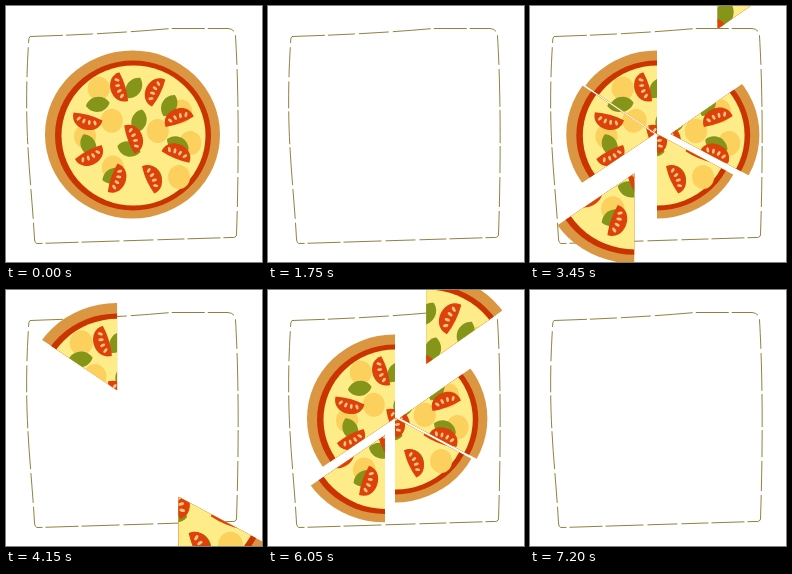
An HTML page with a canvas that plays this animation: 256 by 256 pixels, repeating every 8 s.

```html
<!DOCTYPE html>
<html lang="en">
<head>
<meta charset="utf-8">
<title>Pizza slices</title>
<style>
html, body { margin: 0; width: 100%; height: 100%; overflow: hidden; background: #fff; }
canvas { display: block; width: 100vw; height: 100vh; }
</style>
</head>
<body>
<canvas id="stage"></canvas>
<script>
const LOOP = 8000, STEP = 50, CYCLE = 8200 / 3, STAGGER = 190, DELAY = 80;
const CX = 127, CY = 128, RAD = Math.PI / 180;
const CUTS = [-90, -35, 28, 90, 146, 214, 270];
const LEAF_TILTS = [-8, 122, 118, 25, 52, -22, 66];
const FRAME = new Path2D(`M24 30.5C70 29 115 27 165 22.5H222Q229 23 229.5 30
  C232 70 233.5 140 230.5 229Q230 232 225 231.5L32 237.5Q29 238 28.5 233
  C25 170 17 125 22.5 38Q22.5 31 24 30.5`);
const canvas = document.getElementById('stage');
const ctx = canvas.getContext('2d');

function ellipse(x, y, rx, ry, color, tilt = 0) {
  ctx.fillStyle = color;
  ctx.beginPath();
  ctx.ellipse(x, y, rx, ry, tilt * RAD, 0, 7);
  ctx.fill();
}

// Calls put(x, y, angle, index) for count places around the centre
function ring(count, start, step, radius, grow, put) {
  for (let i = 0; i < count; i++) {
    const angle = start + i * step, r = radius + i * grow;
    put(CX + r * Math.cos(angle * RAD), CY + r * Math.sin(angle * RAD), angle, i);
  }
}

function blob(x, y) {
  ellipse(x, y, 11, 12, '#fbd05c');
}

function leaf(x, y, tilt) {
  ctx.save();
  ctx.translate(x, y);
  ctx.rotate(tilt * RAD);
  ctx.fillStyle = '#84951a';
  ctx.beginPath();
  ctx.moveTo(-12, 0);
  ctx.bezierCurveTo(-7, -10, 7, -10, 12, 0);
  ctx.bezierCurveTo(7, 10, -7, 10, -12, 0);
  ctx.fill();
  ctx.restore();
}

// Half moon lying along the given angle
function tomato(x, y, angle) {
  ctx.save();
  ctx.translate(x, y);
  ctx.rotate(angle * RAD);
  ctx.fillStyle = '#dc420a';
  ctx.beginPath();
  ctx.moveTo(-15, 5);
  ctx.bezierCurveTo(-15, -13, 15, -13, 15, 5);
  ctx.quadraticCurveTo(0, 8, -15, 5);
  ctx.fill();
  for (let i = -1.5; i < 2; i++)
    ellipse(i * 5.6, Math.abs(i) - 1, 1.4, 2.6, '#f9c583', i * 22);
  ctx.restore();
}

function pizza() {
  ellipse(126.5, 128.5, 87.5, 84, '#db9642');
  ellipse(127, 129.5, 78, 75, '#c93400');
  ellipse(127.5, 129.5, 72, 70, '#fdec88');
  ring(3, -25, 34, 53, 5, blob);
  ring(3, 121, 56, 39, 9, blob);
  ring(2, 212, 141, 25, 0, blob);
  ring(7, -140, 51, 46, 0, (x, y, angle, i) => leaf(x, y, LEAF_TILTS[i]));
  leaf(133, 115, 105);
  leaf(123, 143, 15);
  ring(8, -107, 43.2, 48, 0, tomato);
  tomato(128, 132, 70);
}

function travel(ms) {
  const x = Math.max(0, ms - DELAY) / 670;
  return 24 * x + 117 * x ** 3.4;
}

// Opposite slices leave in turn: 0, 3, 1, 4, 2, 5
function distance(slice, phase) {
  const turn = slice % 3 * 2 + (slice > 2);
  return travel(phase - turn * STAGGER);
}

function addWedge(path, slice) {
  path.moveTo(CX, CY);
  path.arc(CX, CY, 100, CUTS[slice] * RAD, CUTS[slice + 1] * RAD);
  path.closePath();
}

// A slice slides outwards and grows a little from its tip
function drawSlice(slice, d) {
  const dir = (slice - 1) * 60 * RAD, zoom = 1 + d / 700;
  const wedge = new Path2D();
  addWedge(wedge, slice);
  ctx.save();
  ctx.translate(CX + d * Math.cos(dir), CY + d * Math.sin(dir));
  ctx.scale(zoom, zoom);
  ctx.translate(-CX, -CY);
  ctx.clip(wedge);
  pizza();
  ctx.restore();
}

function draw(t) {
  const phase = t % CYCLE, { width, height } = canvas;
  ctx.setTransform(width / 256, 0, 0, height / 256, 0, 0);
  ctx.fillStyle = '#fff';
  ctx.fillRect(0, 0, 256, 256);
  ctx.strokeStyle = '#83742c';
  ctx.lineWidth = 0.9;
  ctx.setLineDash([33, 3, 27, 4, 30, 4, 38, 3]);
  ctx.stroke(FRAME);

  // Slices at rest share one clip, so no seams show
  const rest = new Path2D();
  for (let i = 0; i < 6; i++) if (!distance(i, phase)) addWedge(rest, i);
  ctx.save();
  ctx.clip(rest);
  pizza();
  ctx.restore();
  for (let i = 0; i < 6; i++) {
    const d = distance(i, phase);
    if (d) drawSlice(i, d);
  }
}

function resize() {
  const ratio = window.devicePixelRatio || 1;
  canvas.width = Math.round(innerWidth * ratio);
  canvas.height = Math.round(innerHeight * ratio);
}

let start;
function tick(now) {
  start ??= now;
  const t = (now - start) % LOOP;
  draw(Math.floor(t / STEP) * STEP);
  requestAnimationFrame(tick);
}

addEventListener('resize', resize);
resize();
draw(0);
requestAnimationFrame(tick);
</script>
</body>
</html>
```
